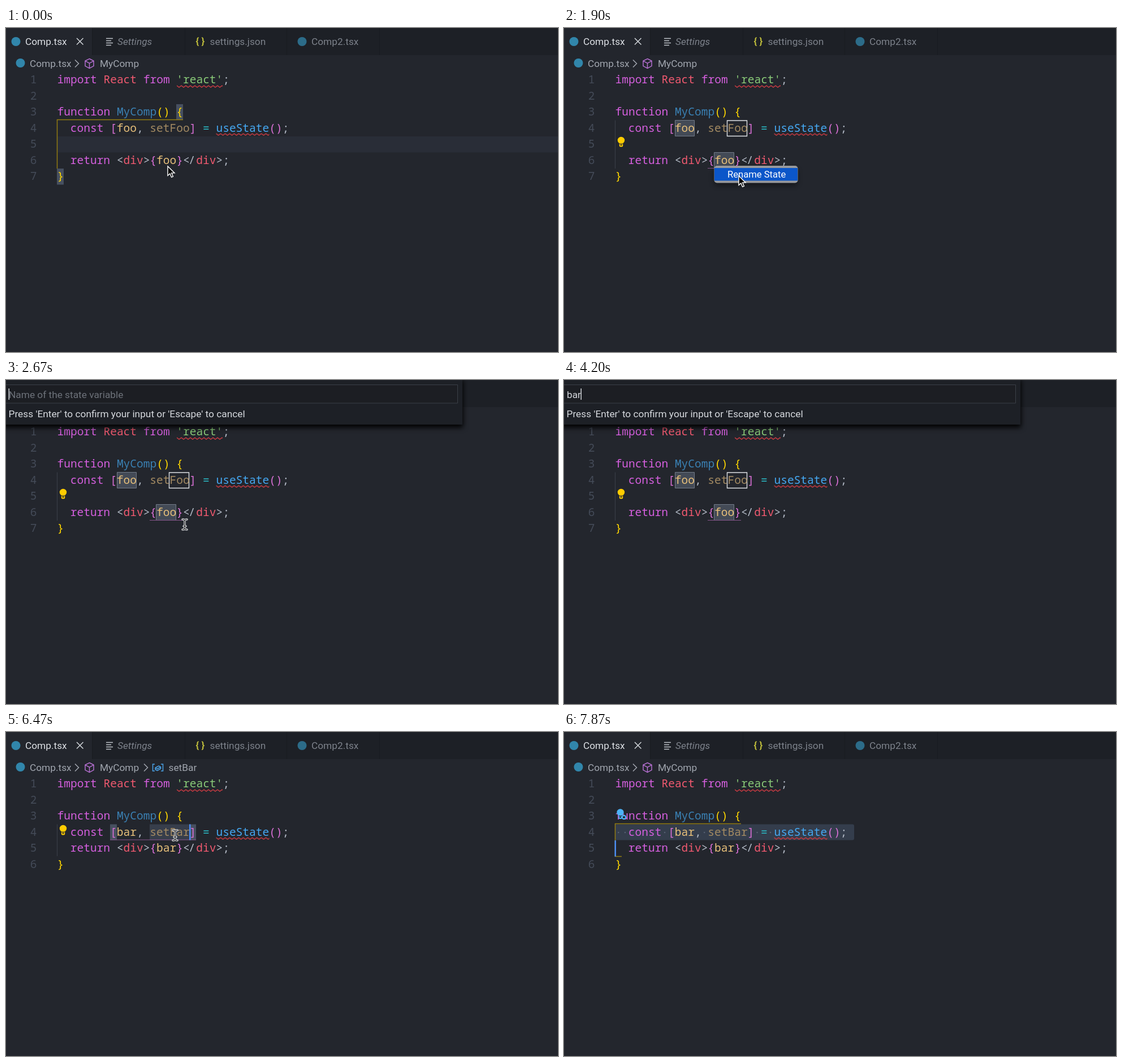
Recreate the animation shown at these times as an HTML page. Size 976x574 px, loop 8010 ms.

```html
<!DOCTYPE html>
<html lang="en">
<head>
<meta charset="utf-8">
<title>Rename state in the editor</title>
<style>
html, body { margin: 0; width: 100%; height: 100%; overflow: hidden; background: #23262d; }
svg { display: block; }
text { white-space: pre; }
.ui text { font: 17.3px Roboto, sans-serif; }
.code text { font: 500 19.53px "Noto Sans Mono", monospace; font-variant-ligatures: none; fill: #b3bac6; }
.code .nums text { font-weight: 400; fill: #444b58; text-anchor: middle; }
.line { fill: none; stroke-width: 1.5; }
.k { fill: #d55fde; }
.r { fill: #ef596f; }
.g { fill: #89ca78; }
.y { fill: #e8c07a; }
.u { fill: #a38a62; }
.f { fill: #45a8f2; }
.m { fill: #3a80b3; }
.e { fill: #2bbac5; }
.b1 { fill: #ffd700; }
.b2 { fill: #da70d6; }
.mark { fill: #475060; }
.word { fill: #434a56; stroke: #737b88; }
.dim { fill: #7d828b; }

/* Staged parts are hidden except where their keyframes turn them on. */
.s { opacity: 0; animation: 8.01s step-end infinite; }
@keyframes idle { 0% { opacity: 1 } 9.99% { opacity: 0 } }
@keyframes before { 0% { opacity: 1 } 64.04% { opacity: 0 } }
@keyframes after { 64.04%, 100% { opacity: 1 } }
@keyframes picked { 9.99% { opacity: 1 } 64.04% { opacity: 0 } }
@keyframes renamed { 64.04% { opacity: 1 } 79.9% { opacity: 0 } }
@keyframes double { 79.9% { opacity: 1 } 81.9% { opacity: 0 } }
@keyframes triple { 81.9%, 100% { opacity: 1 } }
@keyframes bulb1 { 11.61% { opacity: 1 } 64.04% { opacity: 0 } }
@keyframes bulb2 { 67.42% { opacity: 1 } 81.9% { opacity: 0 } }
@keyframes bulb3 { 86.14%, 100% { opacity: 1 } }
@keyframes blink { 81.9% { opacity: 1 } 88.14% { opacity: 0 } 94.51%, 100% { opacity: 1 } }
@keyframes menu { 16.23% { opacity: 1 } 27.47% { opacity: 0 } }
@keyframes panel { 27.47% { opacity: 1 } 62.42% { opacity: 0 } }
@keyframes hint { 27.47% { opacity: 1 } 49.94% { opacity: 0 } }
@keyframes type1 { 49.94% { opacity: 1 } 51.02% { opacity: 0 } }
@keyframes type2 { 51.02% { opacity: 1 } 52.18% { opacity: 0 } }
@keyframes type3 { 52.18% { opacity: 1 } 62.42% { opacity: 0 } }
@keyframes caret {
  27.47% { opacity: 1; transform: none }
  33.71% { opacity: 0 }
  39.95% { opacity: 1 }
  45.82% { opacity: 0 }
  49.94% { opacity: 1; transform: translateX(9px) }
  51.02% { opacity: 1; transform: translateX(19px) }
  52.18% { opacity: 1; transform: translateX(25px) }
  58.3% { opacity: 0; transform: translateX(25px) }
}
@keyframes arrow {
  0% { opacity: 1 } 1.25% { opacity: 0 }
  16.23% { opacity: 1 } 27.84% { opacity: 0 }
  91.89% { opacity: 1 } 96% { opacity: 0 }
}
@keyframes beam {
  1.25% { opacity: 1 } 16.23% { opacity: 0 }
  27.84% { opacity: 1 } 49.94% { opacity: 0 }
  64.92% { opacity: 1 } 91.89% { opacity: 0 }
}
.mouse { animation: move 8.01s ease-in-out infinite; }
@keyframes move {
  0%, .37% { transform: translate(286px, 245px) }
  6.24%, 10.86% { transform: translate(284px, 236px) }
  14.11%, 16.23% { transform: translate(266px, 243px) }
  22.47%, 26.84% { transform: translate(309px, 262px) }
  28.71%, 64.92% { transform: translate(316px, 256px) }
  71.79%, 72.78% { transform: translate(384px, 239px) }
  78.65%, 82.77% { transform: translate(299px, 183px) }
  86.14% { transform: translate(340px, 285px) }
  92.38% { transform: translate(590px, 30px) }
  94.88%, 100% { transform: translate(600px, -30px) }
}
</style>
</head>
<body>
<svg width="976" height="574" viewBox="0 0 976 574">
  <defs>
    <pattern id="wave" width="8" height="5" patternUnits="userSpaceOnUse">
      <path class="line" d="M-1 .5 4 4 9 .5" stroke="#c93a42"/>
    </pattern>
    <g id="bulb">
      <path d="M-6.2-2.5a6.2 6.2 0 1 1 12.4 0c0 2.7-1.8 3.9-2.9 5.5h-6.6c-1.1-1.6-2.9-2.8-2.9-5.5z"/>
      <path d="M-3.2 4h6.4v3.2q0 1.8-1.8 1.8h-2.8q-1.8 0-1.8-1.8z"/>
      <path d="M-1.5 4.8h3v2h-3z" fill="#23262d"/>
    </g>
    <path id="stem" d="M-4-9Q0-9 0-6.5Q0-9 4-9M0-6.5V6.5M-4 9Q0 9 0 6.5Q0 9 4 9M-2 3H2"/>
    <filter id="soft" x="-30%" y="-60%" width="160%" height="260%">
      <feGaussianBlur stdDeviation="5"/>
    </filter>
  </defs>
  <rect width="976" height="574" fill="#23262d"/>

  <g class="ui">
    <!-- tabs -->
    <path d="M153 0h823v48H153z" fill="#1d2026"/>
    <path d="M152.5 0v48M316.5 0v48M496.5 0v48M660.5 0v48" stroke="#181b20"/>
    <g fill="#3186ab">
      <circle cx="17.5" cy="24" r="8"/>
      <circle cx="25.5" cy="62" r="8"/>
      <circle cx="523.5" cy="24" r="8" opacity=".75"/>
    </g>
    <text x="34" y="30" fill="#dde0e5">Comp.tsx</text>
    <path class="line" d="M125 18l11.5 11.5M136.5 18L125 29.5" stroke="#d3d6db"/>
    <path class="line" d="M177 18.5h12M177 22.5h9M177 26.5h12M177 30.5h9" stroke="#bfc3c9"/>
    <text class="dim" x="197" y="30" style="font-style:italic">Settings</text>
    <g fill="#c2c03c">
      <text x="335.5" y="29" style="font-weight:700">{</text>
      <text x="345.5" y="29" style="font-weight:700">}</text>
    </g>
    <text class="dim" x="360.5" y="30">settings.json</text>
    <text class="dim" x="540" y="30">Comp2.tsx</text>

    <!-- breadcrumbs -->
    <g fill="#a1a6af">
      <text x="42" y="69">Comp.tsx</text>
      <text x="166" y="69">MyComp</text>
    </g>
    <path class="line" d="M122 56.5l6.5 6.5-6.5 6.5" stroke="#a1a6af"/>
    <path class="line" d="M147.5 54.5l7.5 3.8v9l-7.5 4.2-7.5-4.2v-9zM140 58.3l7.5 4 7.5-4M147.5 62.3v9" stroke="#b46fd0"/>
    <g class="s" style="animation-name:double">
      <path class="line" d="M244 56.5l6.5 6.5-6.5 6.5" stroke="#a1a6af"/>
      <path class="line" d="M263 57h-3.5v12h3.5M274 57h3.5v12h-3.5M264 63.5l6-3.5 3.5 2v3l-6 3.5-3.5-2zM264 63.5l3.5 1.8 6-3.3" stroke="#4aa3e8"/>
      <text x="287.5" y="69" fill="#a1a6af">setBar</text>
    </g>
  </g>

  <!-- highlights below the text -->
  <g class="s" style="animation-name:idle">
    <path d="M90 192h886v28.5H90z" fill="#292d37"/>
    <path class="mark" d="M301 135h12v28h-12zM90 249h12v28.5H90z"/>
    <path class="line" d="M313 162.5H90.5V249" stroke="#927c12"/>
  </g>
  <g class="s" style="animation-name:picked">
    <path d="M90.5 163.5V249" stroke="#3b4049"/>
    <path class="word" d="M196.5 163.5h34v28h-34zM265.5 220.5h35v28h-35z"/>
    <path d="M288.5 164h35v27.5h-35z" fill="none" stroke="#dfe2e6" stroke-width="1.4"/>
    <path d="M254 248.5h59" stroke="#86558b"/>
  </g>
  <g class="s" style="animation-name:renamed">
    <path d="M90 192h886v28.5H90z" fill="#292d37"/>
    <path class="mark" d="M254.5 192h11.5v28h-11.5zM301 192h12v28h-12z"/>
    <path d="M90.5 163.5V220" stroke="#5f6570"/>
    <path d="M254 219.5h59" stroke="#86558b"/>
  </g>
  <g class="s" style="animation-name:double">
    <path d="M90.5 163.5V220" stroke="#3b4049"/>
    <path d="M254 163.5h71v28h-71z" fill="#373e4b"/>
    <path class="mark" d="M184 163.5h12v28h-12zM324 163.5h12v28h-12z"/>
    <path d="M184 191h152" stroke="#86558b"/>
  </g>
  <g class="s" style="animation-name:triple">
    <path d="M90 163.5h420q3 0 3 3v22q0 3-3 3H90z" fill="#343d4c"/>
    <g fill="#566072">
      <circle cx="96.3" cy="178" r="1.3"/><circle cx="108" cy="178" r="1.3"/>
      <circle cx="178.1" cy="178" r="1.3"/><circle cx="248.2" cy="178" r="1.3"/>
      <circle cx="341.6" cy="178" r="1.3"/><circle cx="365" cy="178" r="1.3"/>
    </g>
    <path class="line" d="M313 162.5H90.5V220.5H102" stroke="#927c12"/>
  </g>

  <!-- code -->
  <g class="code">
    <g class="nums">
      <text x="48.5" y="98">1</text>
      <text x="48.5" y="126.6">2</text>
      <text x="48.5" y="155.1">3</text>
      <text x="48.5" y="183.7">4</text>
      <text x="48.5" y="212.3">5</text>
      <text x="48.5" y="240.8">6</text>
      <text class="s" style="animation-name:before" x="48.5" y="269.4">7</text>
    </g>
    <text x="90.5" y="98"><tspan class="k">import</tspan> <tspan class="r">React</tspan> <tspan class="k">from</tspan> <tspan class="g">'react'</tspan>;</text>
    <text x="90.5" y="155.1"><tspan class="k">function</tspan> <tspan class="m">MyComp</tspan><tspan class="b1">() {</tspan></text>
    <g class="s" style="animation-name:before">
      <text x="113.8" y="183.7"><tspan class="k">const</tspan> <tspan class="b2">[</tspan><tspan class="y">foo</tspan>, <tspan class="u">setFoo</tspan><tspan class="b2">]</tspan> <tspan class="e">=</tspan> <tspan class="f">useState</tspan><tspan class="b2">()</tspan>;</text>
      <text x="113.8" y="240.8"><tspan class="k">return</tspan> &lt;<tspan class="r">div</tspan>&gt;<tspan class="b2">{</tspan><tspan class="y">foo</tspan><tspan class="b2">}</tspan>&lt;<tspan dx="-2">/</tspan><tspan class="r" dx="2">div</tspan>&gt;;</text>
      <text x="90.5" y="269.4"><tspan class="b1">}</tspan></text>
    </g>
    <g class="s" style="animation-name:after">
      <text x="113.8" y="183.7"><tspan class="k">const</tspan> <tspan class="b2">[</tspan><tspan class="y">bar</tspan>, <tspan class="u">setBar</tspan><tspan class="b2">]</tspan> <tspan class="e">=</tspan> <tspan class="f">useState</tspan><tspan class="b2">()</tspan>;</text>
      <text x="113.8" y="212.3"><tspan class="k">return</tspan> &lt;<tspan class="r">div</tspan>&gt;<tspan class="b2">{</tspan><tspan class="y">bar</tspan><tspan class="b2">}</tspan>&lt;<tspan dx="-2">/</tspan><tspan class="r" dx="2">div</tspan>&gt;;</text>
      <text x="90.5" y="240.8"><tspan class="b1">}</tspan></text>
    </g>
    <rect width="81" height="5" transform="translate(302 101)" fill="url(#wave)"/>
    <rect width="94" height="5" transform="translate(371.5 186)" fill="url(#wave)"/>
  </g>

  <!-- text carets and bulbs -->
  <path class="s" style="animation-name:double" d="M324 163.5h2.5v28H324z" fill="#4a8df5"/>
  <path class="s" style="animation-name:blink" d="M89.5 192h2.5v28.5h-2.5z" fill="#4a8df5"/>
  <g fill="#fc0">
    <g class="s" style="animation-name:bulb1"><use href="#bulb" x="101" y="201.5"/></g>
    <g class="s" style="animation-name:bulb2"><use href="#bulb" x="101" y="173.5"/></g>
  </g>
  <g class="s" style="animation-name:bulb3" fill="#4db2f7">
    <use href="#bulb" x="99.5" y="145"/>
    <circle cx="106" cy="151" r="3.2" fill="#23262d" stroke="#4db2f7" stroke-width="2.2"/>
  </g>

  <!-- context menu -->
  <g class="s ui" style="animation-name:menu">
    <rect x="265" y="249" width="148" height="30" rx="6" opacity=".4" filter="url(#soft)"/>
    <rect x="265.5" y="244" width="148" height="30.5" rx="5" fill="#98999c"/>
    <path d="M266 248h147v22.5H266z" fill="#0b56c9"/>
    <text x="289" y="264.5" fill="#fff" style="font-size:16.6px">Rename State</text>
  </g>

  <!-- input panel -->
  <g class="s ui" style="animation-name:panel">
    <path d="M807 0h169v48H153V0z" fill="#1d2026"/>
    <path d="M-20 0h828v84H-20z" filter="url(#soft)"/>
    <path d="M0 0h807v79H0z" fill="#1d2026"/>
    <path d="M-2 8.5h800.5v32.5H-2z" fill="#1c1e23" stroke="#3b3f47"/>
    <text x="4.5" y="66" fill="#d6d9de">Press 'Enter' to confirm your input or 'Escape' to cancel</text>
    <g fill="#d2d5da">
      <text class="s" style="animation-name:hint" x="5" y="32" fill="#6d727a">Name of the state variable</text>
      <text class="s" style="animation-name:type1" x="5" y="32">b</text>
      <text class="s" style="animation-name:type2" x="5" y="32">ba</text>
      <text class="s" style="animation-name:type3" x="5" y="32">bar</text>
      <path class="s" style="animation-name:caret" d="M4.5 15H6v20H4.5z"/>
    </g>
  </g>

  <!-- mouse -->
  <g class="mouse">
    <path class="s" style="animation-name:arrow" d="M0 0V16.5L3.9 12.9 6.6 19.3 9.4 18.1 6.7 11.9H12Z" stroke="#fff" stroke-width="1.4"/>
    <g class="s" style="animation-name:beam" fill="none" stroke-linecap="round">
      <use href="#stem" stroke="#e8eaed" stroke-width="3.4"/>
      <use href="#stem" stroke="#111" stroke-width="1.2"/>
    </g>
  </g>
</svg>
</body>
</html>
```
